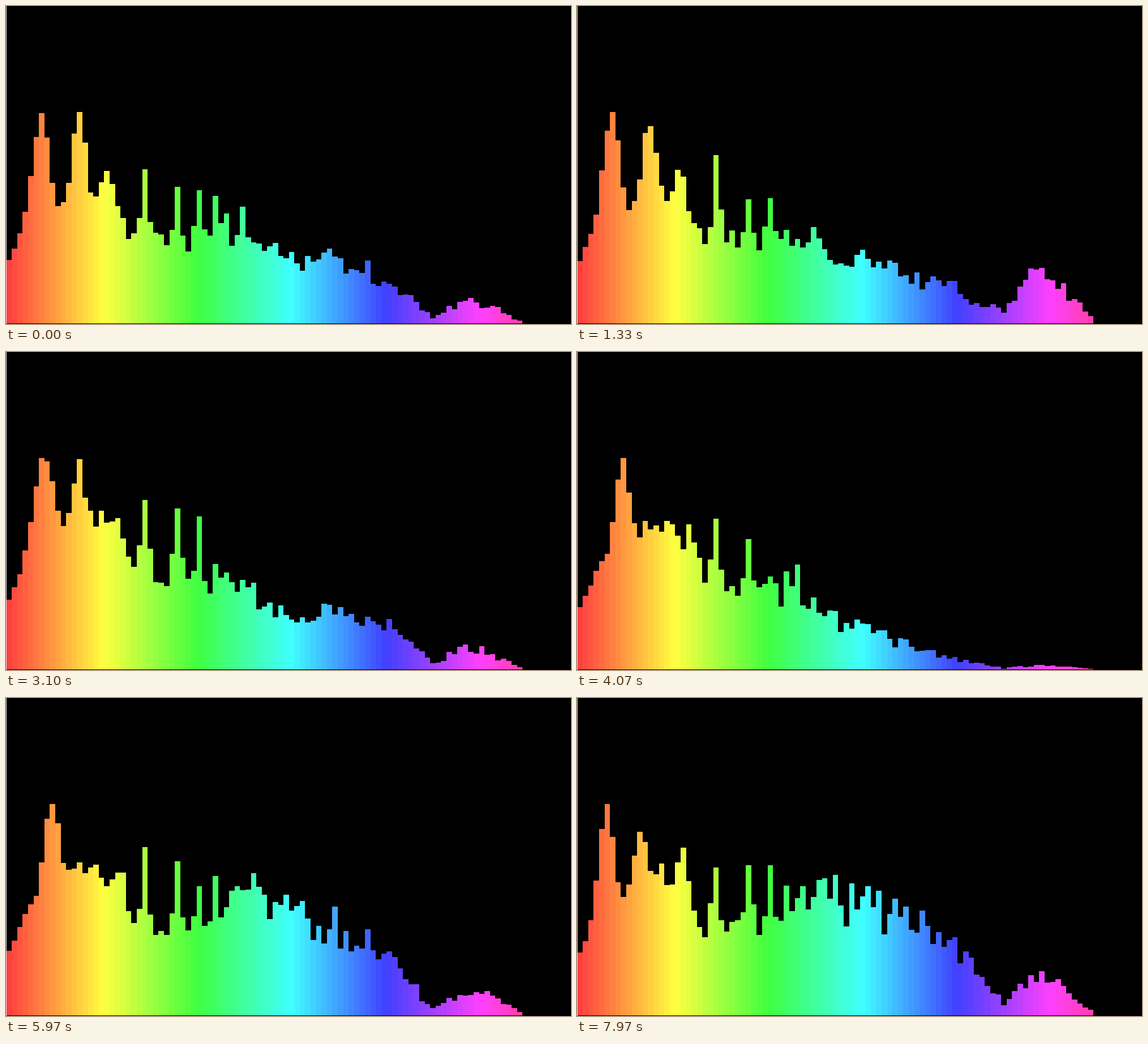
Write an HTML page with a canvas that moves like this. It is 998 by 561 pixels and loops after 8000 ms.

```html
<!DOCTYPE html>
<html lang="en">
<head>
<meta charset="utf-8">
<title>Spectrum</title>
<style>
  html, body { margin: 0; width: 100%; height: 100%; overflow: hidden; background: #000; }
  canvas { display: block; width: 998px; height: 561px; }
</style>
</head>
<body>
<canvas id="stage" width="998" height="561"></canvas>
<script>
const ctx = document.getElementById('stage').getContext('2d');
const LOOP = 8000, STEP = 100 / 3, SLOTS = 104, BARS = 95, FLOOR = 560, PEAK = 373;
const pitch = 998 / SLOTS;

// Bass notes of each chord: bar and height above the floor.
const chords = {
  low: [[5, 180], [11, 135], [15, 60], [19, 110]],
  open: [[6, 180], [13, 170], [18.4, 72]],
  high: [[8, 183], [12.3, 65], [16, 82], [20.5, 75]]
};

// Chord and loudness of the mid, high and air bands over time.
const keys = [
  { at: 0, chord: 'open', mid: 120, high: 90, air: 42 },
  { at: 1330, chord: 'open', mid: 105, high: 72, air: 95 },
  { at: 2200, chord: 'open', mid: 95, high: 150, air: 60 },
  { at: 4070, chord: 'high', mid: 72, high: 24, air: 8 },
  { at: 5130, chord: 'high', mid: 180, high: 140, air: 38 },
  { at: 6770, chord: 'high', mid: 185, high: 115, air: 52 },
  { at: 7970, chord: 'low', mid: 205, high: 145, air: 74 }
];

const mix = (a, b, k) => a + (b - a) * k;
const clamp = k => Math.min(1, Math.max(0, k));
const smooth = k => k * k * (3 - 2 * k);
const bell = (d, width) => Math.exp(-((d / width) ** 2));

function hash(a, b) {
  let n = Math.imul(a + 17, 374761393) ^ Math.imul(b + 31, 668265263);
  n = Math.imul(n ^ n >>> 13, 1274126177);
  return ((n ^ n >>> 16) >>> 0) / 2 ** 31 - 1;
}

function flutter(seed, t) {
  const beat = t / 190 + (hash(seed, 999) + 1) / 2;
  const n = Math.floor(beat);
  return mix(hash(seed, n), hash(seed, n + 1), smooth(beat - n));
}

function floorAt(bar, { mid, high, air }) {
  const points = [
    [0, 112], [4, 195], [17, 195], [23, 155], [33, 115 + mid * 0.2], [43, 25 + mid * 0.85],
    [53, mid], [66, high], [71, high * 0.7], [78, air * 0.25], [84, air], [88, air * 0.8], [BARS, 0]
  ];
  const i = points.findIndex(p => p[0] > bar);
  const [x0, y0] = points[i - 1], [x1, y1] = points[i];
  return mix(y0, y1, (bar - x0) / (x1 - x0));
}

const chordAt = (bar, name) => chords[name].reduce(
  (sum, [note, height]) => sum + height * bell(bar - note, bar < note ? 2 : 1.7), 0);

// Overtones of the bass on the logarithmic axis, twelve bars to the octave.
function overtonesAt(bar, t) {
  let sum = 0;
  for (let n = 3; n <= 10; n++) {
    const centre = Math.floor(6.63 + 12.22 * Math.log2(n));
    sum += (140 - 13 * n + 72 / n) * (1 + 0.2 * flutter(200 + n, t)) * bell(bar - centre, 0.85);
  }
  return sum;
}

function heightsAt(t) {
  const i = Math.max(1, keys.findIndex(key => key.at > t));
  const a = t >= keys.at(-1).at ? keys.at(-1) : keys[i - 1];
  const b = t >= keys.at(-1).at ? a : keys[i];
  const k = a === b ? 0 : (t - a.at) / (b.at - a.at);
  const band = name => mix(a[name], b[name], smooth(k));
  const bands = { mid: band('mid'), high: band('high'), air: band('air') };
  const change = smooth(clamp((k - 0.35) / 0.3));

  const heights = Array.from({ length: BARS }, (_, bar) => {
    const chord = mix(chordAt(bar, a.chord), chordAt(bar, b.chord), change);
    const swing = mix(0.03, 0.3, clamp((bar - 6) / 60));
    return (floorAt(bar, bands) + chord + overtonesAt(bar, t)) * (1 + swing * flutter(bar, t));
  });
  const gain = PEAK / Math.max(...heights);
  return heights.map(h => h * gain);
}

function draw(t) {
  ctx.fillStyle = '#000';
  ctx.fillRect(0, 0, 998, 561);
  heightsAt(t).forEach((h, bar) => {
    const left = Math.round(0.7 + bar * pitch), right = Math.round(0.7 + (bar + 1) * pitch);
    const top = Math.round(FLOOR - h);
    ctx.fillStyle = `hsl(${bar * 360 / SLOTS}, 100%, 62.5%)`;
    ctx.fillRect(left, top, right - left, FLOOR - top);
  });
  ctx.fillStyle = '#ddd';
  ctx.fillRect(0, 0, 1, 561);
}

const start = performance.now();
function tick() {
  const t = Math.max(0, performance.now() - start) % LOOP;
  draw(Math.floor((t + 3.5) / STEP) * STEP);
  requestAnimationFrame(tick);
}
tick();
</script>
</body>
</html>
```
